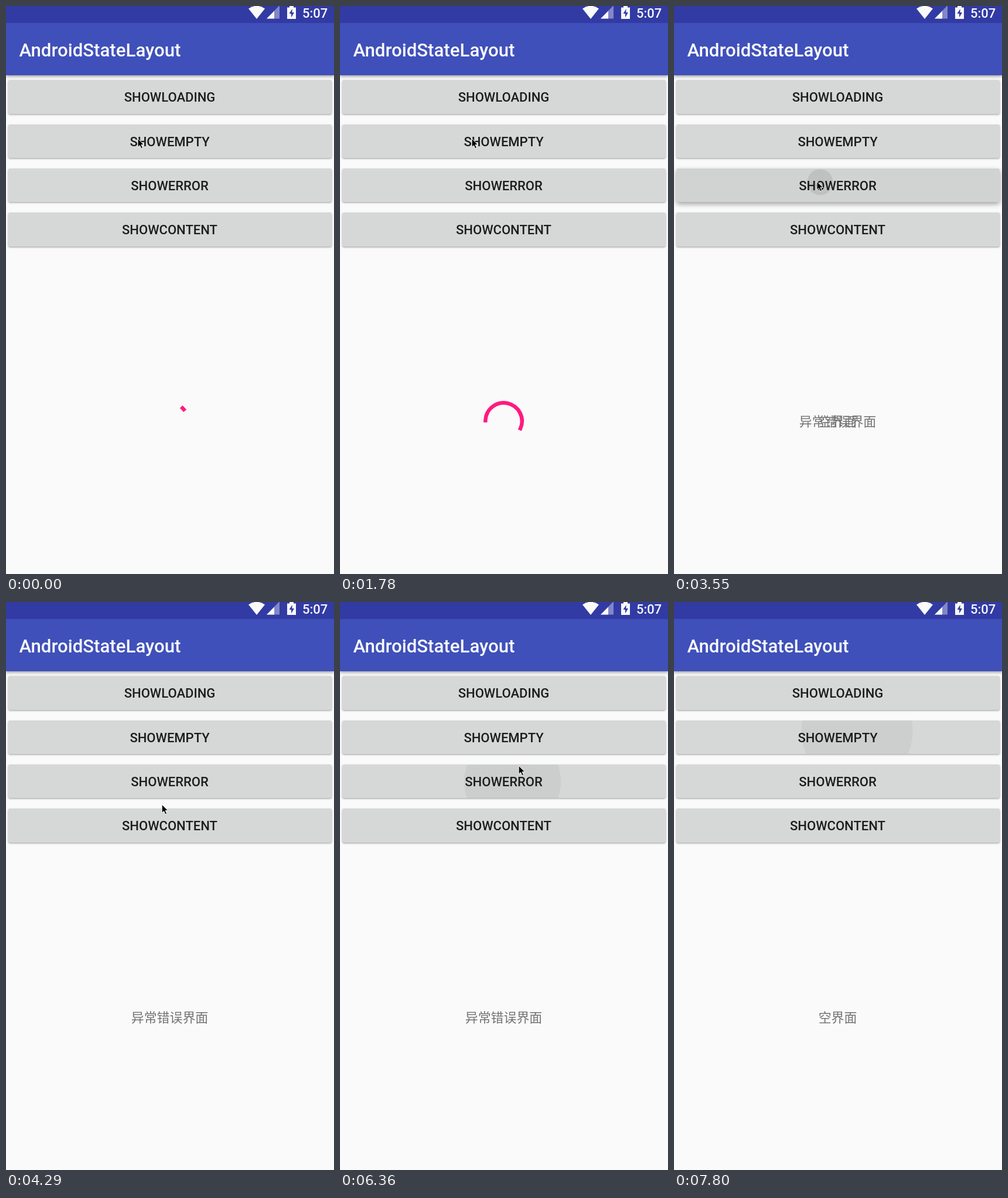
These frames come from a looping animation (560 px wide and 968 px high, 9120 ms). An HTML page:

```html
<!DOCTYPE html>
<html lang="zh-CN">
<head>
<meta charset="utf-8">
<title>State layout demo</title>
<style>
html, body { margin: 0; width: 100%; height: 100%; overflow: hidden; background: #fafafa; }
body { position: relative; font-family: Roboto, sans-serif; }
#bar { position: absolute; left: 0; top: 0; width: 560px; height: 117.5px; background: #3f50ba; box-shadow: 0 2px 5px rgba(0,0,0,.4); }
.btn { position: absolute; left: 3.5px; width: 552px; height: 57.5px; border-radius: 3px;
  background-color: #d6d7d7; color: #1c1c1c; text-align: center; font-weight: 500; font-size: 22px; line-height: 60.5px; }
svg { position: absolute; left: 0; top: 0; }
.msg { font: 21.9px "Noto Sans CJK SC", "Noto Sans CJK", sans-serif; fill: #737373; text-anchor: middle; }
</style>
</head>
<body>
<div id="bar"></div>
<svg width="560" height="968" viewBox="0 0 560 968">
  <rect width="560" height="29" fill="#323ba3"/>
  <g fill="#fafafa" font-weight="500">
    <path d="M414 4.5Q428-5 442 4.5L428 22Z"/>
    <path d="M467-1V21.5H445Z" opacity=".4"/>
    <path d="M458 8.5V21.5H445Z"/>
    <path d="M484 0H491V2.5H495V22H480V2.5H484Z"/>
    <path d="M488.5 5L483.5 13H487V19.5L492 11H488.5Z" fill="#323ba3"/>
    <text x="506" y="20" font-size="22">5:07</text>
    <text x="22.5" y="86" font-size="31.2">AndroidStateLayout</text>
  </g>
  <path id="loading" fill="none" stroke="#ff1a80" stroke-width="6.5" stroke-linecap="square"/>
  <text class="msg" id="empty" x="279.5" y="716.3">空界面</text>
  <text class="msg" id="error" x="279.5" y="716.3">异常错误界面</text>
  <text class="msg" id="content" x="279.5" y="716.3">内容界面</text>
</svg>
<svg id="top" width="560" height="968" viewBox="0 0 560 968">
  <path id="cursor" d="M0 0V14.5L3.4 11.4L5.8 16.8L8.4 15.7L6 10.4H10.5Z" stroke="#fff" stroke-width="1"/>
</svg>
<script>
const LOOP = 9120, LAST = 7800, TICK = 147.7, FADE = 250;
const $ = id => document.getElementById(id);
const clamp = v => Math.max(0, Math.min(1, v));
const views = ['loading', 'empty', 'error', 'content'];

const buttons = views.map((name, i) => {
  const el = document.createElement('div');
  el.className = 'btn';
  el.textContent = 'SHOW' + name.toUpperCase();
  el.style.top = 126.2 + 75.3 * i + 'px';
  document.body.insertBefore(el, $('top'));
  return el;
});

// press time, click time, button index, touch point
const taps = [
  [1860, 1890, 1, 229, 228],
  [3410, 3540, 2, 249, 300],
  [4800, 4980, 3, 284, 381],
  [6080, 6110, 2, 294, 306],
  [7050, 7060, 0, 317, 162],
  [7470, 7496, 1, 312, 220]
];

// time, x, y
const route = [
  [0, 225, 226], [2440, 225, 226], [2960, 244, 299], [3900, 244, 299],
  [4590, 283, 380], [5500, 283, 380], [5910, 297, 303], [6210, 297, 303],
  [6360, 305, 280], [6800, 316, 162], [7010, 316, 162], [7100, 321, 180],
  [7390, 318, 220], [LAST, 318, 220]
];

// cubic-bezier(.4, 0, .2, 1)
function ease(x) {
  let lo = 0, hi = 1, s = .5;
  for (let i = 0; i < 20; i++) {
    s = (lo + hi) / 2;
    if (1.2 * s * (1 - s) ** 2 + .6 * s * s * (1 - s) + s ** 3 < x) lo = s; else hi = s;
  }
  return s * s * (3 - 2 * s);
}

function drawSpinner(t) {
  const age = t < 7000 ? t + 3875 : Math.max(0, t - 7060);
  const u = age / 1333 % 1;
  const base = age * 720 / 6665 + 90 * u;
  const from = base + 270 * ease(clamp(2 * u - 1));
  const to = Math.max(base + 270 * ease(clamp(2 * u)), from + .5);
  const at = deg => {
    const a = deg * Math.PI / 180;
    return `${279.5 + 31.2 * Math.sin(a)} ${707.5 - 31.2 * Math.cos(a)}`;
  };
  $('loading').setAttribute('d', `M${at(from)}A31.2 31.2 0 ${to - from > 180 ? 1 : 0} 1 ${at(to)}`);
}

function drawViews(t) {
  const alpha = [0, 0, 0, 0];
  let now = 0;
  for (const [, click, next] of taps) {
    if (t < click) break;
    alpha[now] = clamp(1 - (t - click) / FADE);
    now = next;
  }
  alpha[now] = 1;
  views.forEach((id, i) => $(id).setAttribute('opacity', alpha[i]));
}

function drawButtons(t) {
  buttons.forEach((el, i) => {
    let lift = 0, ripple = 'none';
    for (const [press, click, index, x, y] of taps) {
      const age = t - click, r = 19 + age / 4;
      if (index !== i || t < press || age > 600) continue;
      lift = clamp((t - press) / 100) * clamp((150 - age) / 100);
      const layer = a => `rgba(0,0,0,${a})`;
      const held = layer(.025 * lift);
      ripple = `linear-gradient(${held}, ${held})`;
      if (r > 1) {
        const ink = layer(.085 * clamp(1 - age / 600));
        const cx = x - 3.5, cy = y - 126.2 - 75.3 * i;
        ripple += `, radial-gradient(circle at ${cx}px ${cy}px, ${ink} ${r - .5}px, transparent ${r + .5}px)`;
      }
    }
    el.style.backgroundImage = ripple;
    el.style.boxShadow = `0 ${1.2 + 2.3 * lift}px ${3 + 5 * lift}px rgba(0,0,0,.36)`;
  });
}

function drawCursor(t) {
  const n = Math.max(1, route.findIndex(p => p[0] >= t));
  const [t0, x0, y0] = route[n - 1], [t1, x1, y1] = route[n];
  const k = clamp((t - t0) / (t1 - t0));
  $('cursor').setAttribute('transform', `translate(${x0 + (x1 - x0) * k} ${y0 + (y1 - y0) * k})`);
  $('cursor').setAttribute('visibility', t < LAST ? 'visible' : 'hidden');
}

const start = performance.now();
function frame() {
  const ms = (performance.now() - start) % LOOP;
  // the screen refreshes in coarse ticks and then holds its last picture
  const t = ms >= LAST ? LAST : Math.floor(ms / TICK) * 148;
  drawSpinner(t);
  drawViews(t);
  drawButtons(t);
  drawCursor(t);
  requestAnimationFrame(frame);
}
frame();
</script>
</body>
</html>
```
